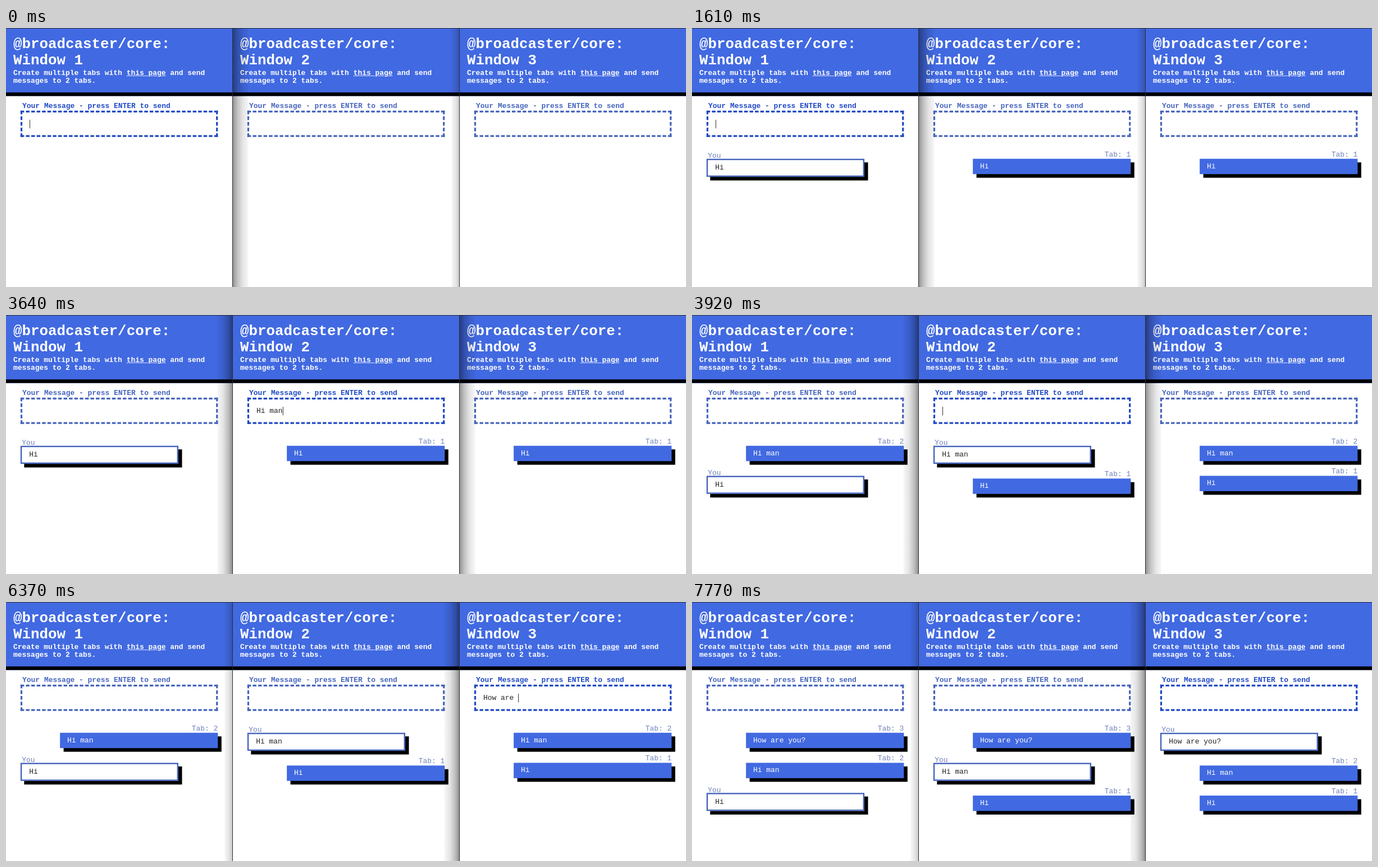
An HTML page that plays this animation: 1211 px wide and 463 px high, repeating every 8000 ms.

```html
<!DOCTYPE html>
<html lang="en">
<head>
<meta charset="utf-8">
<title>Broadcast between tabs</title>
<style>
  html, body { margin: 0; width: 100%; height: 100%; overflow: hidden; background: #fff; }
  body { position: relative; }
  #stage {
    position: absolute; left: 0; top: 0; width: 1500px; height: 574px;
    transform: scale(.808); transform-origin: 0 0;
    font: 16px/18px "Liberation Mono", "Courier New", monospace;
    white-space: pre;
  }
  .win { position: absolute; top: 0; width: 500px; height: 574px; overflow: hidden; background: #fff; }
  .win > *, .msg > * { position: absolute; }
  header {
    left: 0; top: 0; width: 500px; height: 143px; transform: translateY(-.5px);
    background: #4169e1; border-bottom: 8px solid #000; color: #fff; font-weight: bold;
  }
  h1 { position: absolute; left: 16px; top: 19px; margin: 0; font-size: 32px; line-height: 36px; }
  header p { position: absolute; left: 16px; top: 91px; margin: 0; line-height: 18.3px; }
  header u { text-underline-offset: 2px; }
  .label { left: 36px; top: 164px; font-weight: bold; color: #4564bc; }
  .input {
    left: 32px; top: 183px; width: 435px; height: 58px; box-sizing: border-box;
    border: 4px dashed #4564bc;
  }
  .focus .label { color: #1f48c4; }
  .focus .input { border-color: #1f48c4; }
  .typed { left: 52px; top: 203px; color: #222; }
  .caret { top: 203px; width: 1.24px; height: 18.5px; background: #000; }
  .msg {
    top: 0; width: 348px; height: 34px; box-sizing: border-box;
    left: 119px; background: #4169e1; color: #fff; box-shadow: 8px 8px 0 #000;
  }
  .msg b { left: 16px; top: 8px; font-weight: normal; }
  .msg i { right: 0; top: -18px; font-style: normal; color: #7080ba; }
  .msg.own { left: 32px; height: 40px; background: #fff; color: #222; border: 3px solid #4564bc; }
  .msg.own i { left: 0; right: auto; }
  .shade { top: 0; height: 574px; width: 34px; }
  .shade.left {
    left: 0;
    background: linear-gradient(90deg, rgba(0,0,0,.42), rgba(0,0,0,.24) 30%, rgba(0,0,0,.1) 65%, rgba(0,0,0,.03));
  }
  .shade.right {
    right: 0;
    background: linear-gradient(270deg, rgba(0,0,0,.46), rgba(0,0,0,.25) 30%, rgba(0,0,0,.1) 65%, rgba(0,0,0,.03));
  }
  .shade.faint {
    width: 18px;
    background: linear-gradient(270deg, rgba(0,0,0,.22), rgba(0,0,0,.1) 50%, rgba(0,0,0,.03));
  }
  .rule { position: absolute; background: #2b2d33; }
</style>
</head>
<body>
<div id="stage"></div>
<div class="rule" style="left:0;top:0;width:100%;height:1px"></div>
<div class="rule" style="left:403px;top:0;width:1px;height:100%"></div>
<div class="rule" style="left:807px;top:0;width:1px;height:100%"></div>
<script>
const LOOP = 8000;
const CHAR = 16 * 0.60009765625;
const stage = document.getElementById('stage');

// [start, value] steps; the last one reached holds
const active = [[0, 0], [2030, 1], [4690, 2]];
const focus = [[0, 0], [2030, -1], [2380, 1], [4690, -1], [4830, 2]];
const caretOn = [
  [0, 1], [1120, 0], [1610, 1], [4200, 0], [4690, 1], [5390, 0], [5460, 1], [7770, 0]
];
const sent = [[1050, 0, 'Hi'], [3920, 1, 'Hi man'], [7700, 2, 'How are you?']];

const typeOut = (text, times) => times.map((t, i) => [t, text.slice(0, i + 1)]);
const typed = [
  [0, ''],
  ...typeOut('Hi ', [70, 210, 350]), [560, 'Hi'], [1050, ''],
  ...typeOut('Hi man', [2940, 3080, 3220, 3360, 3500, 3640]), [3920, ''],
  ...typeOut('How are you?',
    [5460, 5600, 5740, 5880, 5950, 6090, 6230, 6370, 6580, 6650, 6720, 7210]),
  [7700, '']
];

const at = (steps, t) => steps.reduce((v, [start, value]) => t >= start ? value : v, steps[0][1]);

function add(parent, tag, cls, text = '') {
  const el = document.createElement(tag);
  el.className = cls;
  el.textContent = text;
  parent.append(el);
  return el;
}

const wins = [0, 1, 2].map(i => {
  const el = add(stage, 'section', 'win');
  el.style.left = i * 500 + 'px';
  const head = add(el, 'header', '');
  add(head, 'h1', '', `@broadcaster/core:\nWindow ${i + 1}`);
  const p = add(head, 'p', '', 'Create multiple tabs with ');
  add(p, 'u', '', 'this page');
  p.append(' and send\nmessages to 2 tabs.');
  add(el, 'div', 'label', 'Your Message - press ENTER to send');
  add(el, 'div', 'input');
  const text = add(el, 'div', 'typed');
  const caret = add(el, 'div', 'caret');
  const msgs = sent.map(([, from, body]) => {
    const own = from === i;
    const msg = add(el, 'div', own ? 'msg own' : 'msg');
    add(msg, 'i', '', own ? 'You' : `Tab: ${from + 1}`);
    add(msg, 'b', '', body);
    return msg;
  });
  return { el, text, caret, msgs, left: add(el, 'div', 'shade left'), right: add(el, 'div', 'shade right') };
});

const show = (el, on) => { el.style.display = on ? '' : 'none'; };

function render(t) {
  const front = at(active, t), focused = at(focus, t);
  const draft = at(typed, t), blink = at(caretOn, t);
  wins.forEach((w, i) => {
    const here = focused === i;
    w.el.classList.toggle('focus', here);
    w.text.textContent = here ? draft : '';
    w.caret.style.left = 52 + draft.length * CHAR + 'px';
    show(w.caret, here && blink);

    // the front window casts a strong shadow, the others a faint one to their left
    show(w.left, i === front + 1);
    show(w.right, i < 2 && i !== front);
    w.right.classList.toggle('faint', i + 1 !== front);

    // newest message on top; a transform keeps fractional offsets
    let top = 289.3;
    for (let k = sent.length - 1; k >= 0; k--) {
      const on = t >= sent[k][0];
      show(w.msgs[k], on);
      if (!on) continue;
      w.msgs[k].style.transform = `translateY(${top}px)`;
      top += (sent[k][1] === i ? 40 : 34) + 32.5;
    }
  });
}

const begin = performance.now();
function tick() {
  render((performance.now() - begin) % LOOP);
  requestAnimationFrame(tick);
}
tick();
</script>
</body>
</html>
```
